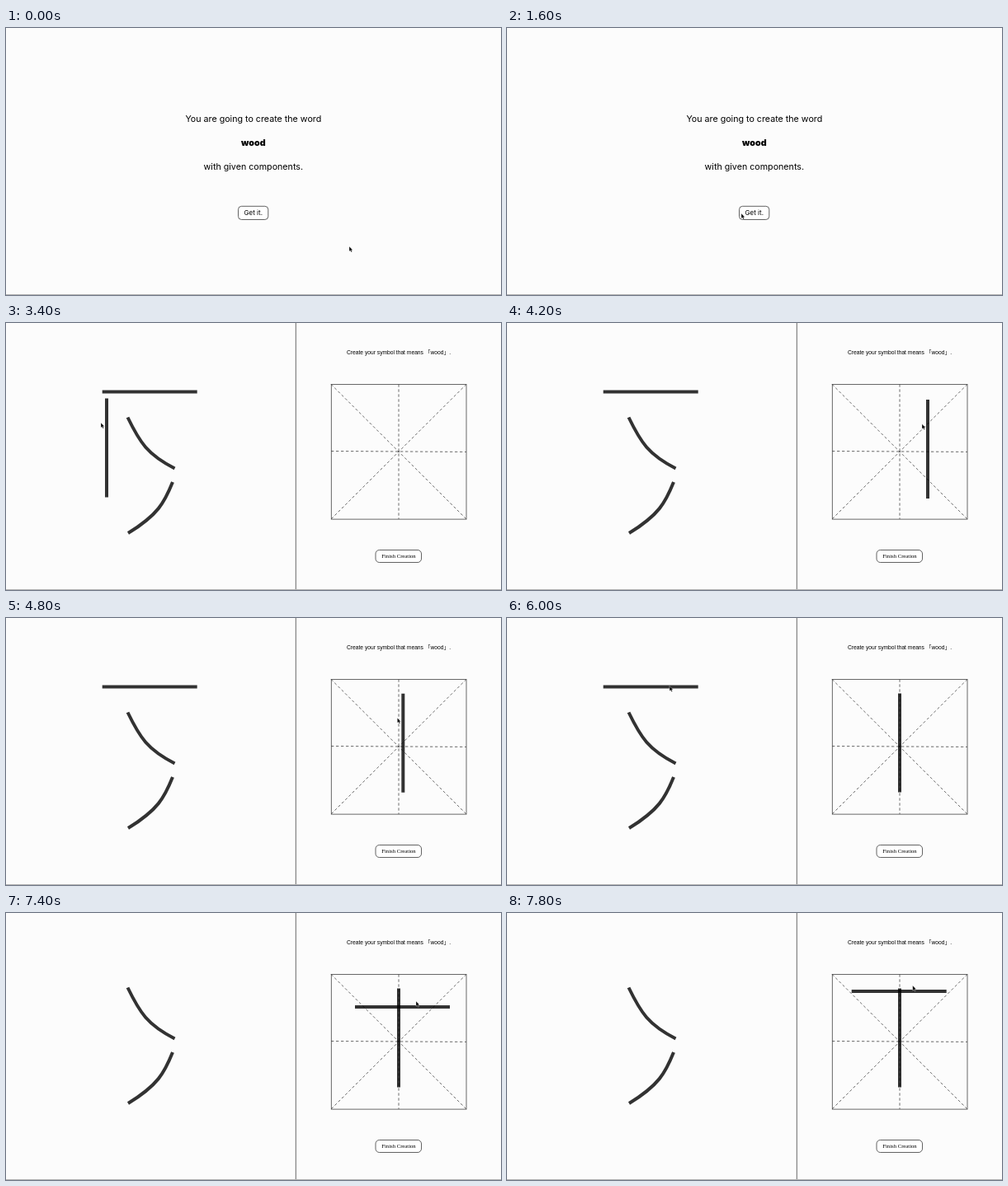
Animation of 600x324 px, one loop 8000 ms. Source, as an HTML page:

```html
<!DOCTYPE html>
<html lang="en">
<head>
<meta charset="utf-8">
<style>
  html, body { margin: 0; width: 100%; height: 100%; overflow: hidden; background: #fcfcfc; }
  svg { display: block; width: 100%; height: 100%; }
  text { text-anchor: middle; }
  #intro { font: 10.7px Inter, sans-serif; }
  #intro .word { font-weight: 900; }
  #intro .label { font-size: 8px; }
  #task { font: 6.7px "Liberation Sans", "Noto Sans CJK JP", sans-serif; }
  #task .label { font-family: "Liberation Serif", serif; }
  .line { fill: none; stroke: #444; stroke-width: .8; }
  .button { fill: #fff; stroke: #222; stroke-width: .7; }
  .stroke { fill: none; stroke: rgba(0, 0, 0, .8); stroke-width: 4; }
</style>
</head>
<body>
<svg viewBox="0 0 600 324">
  <rect width="600" height="324" fill="#fcfcfc"/>
  <rect y="323" width="600" height="1" fill="#b4b4b4"/>

  <g id="intro">
    <text x="299.8" y="114.3">You are going to create the word</text>
    <text x="299.8" y="143.2" class="word">wood</text>
    <text x="299.8" y="172">with given components.</text>
    <rect class="button" x="281.5" y="216.3" width="36.3" height="16.2" rx="4"/>
    <text x="299.8" y="227" class="label">Get it.</text>
  </g>

  <g id="task">
    <path class="line" d="M351.3 0V323"/>
    <text x="476" y="38">Create your symbol that means 「wood」.</text>
    <rect class="line" x="394.3" y="74.4" width="163.7" height="163.7"/>
    <path class="line" stroke-dasharray="3.3 2.7"
      d="M394 74.4L558 238M558 74.4L394 238M476 74.4V238M394 155.5L558 156.4"/>
    <rect class="button" x="448" y="275.5" width="55.5" height="15" rx="4.5"/>
    <text x="476" y="285.2" class="label">Finish Creation</text>
    <path id="upright" class="stroke" d="M0 0V120"/>
    <path id="bar" class="stroke" d="M0 0H115"/>
    <path id="right" class="stroke" d="M0 0C15 31 24 45 57 62"/>
    <path id="left" class="stroke" d="M0 0C-10 25 -18 40 -54 62"/>
  </g>

  <path id="cursor" d="M0 0V6.1L1.4 4.9L2.4 7.1L3.5 6.6L2.6 4.5H4.3Z" stroke="#fff" stroke-width=".35"/>
</svg>
<script>
const LOOP = 8000, STEP = 200;
const OPEN = 2000, GRAB_UPRIGHT = 3400, DROP_UPRIGHT = 5000, GRAB_BAR = 6400;

const home = { x: 416, y: 265 };
const moves = [
  { start: 800, end: 1600, x: 284, y: 225 },             // to the button
  { start: 2200, end: 2800, x: 128, y: 122 },            // to the upright
  { start: 2800, end: GRAB_UPRIGHT, x: 115, y: 121 },
  { start: GRAB_UPRIGHT, end: 4200, x: 503, y: 122.5 },  // drag it, then centre it
  { start: 4200, end: DROP_UPRIGHT, x: 469, y: 121 },
  { start: 5200, end: 6000, x: 197, y: 82.5 },           // to the bar
  { start: GRAB_BAR, end: 6800, x: 483, y: 124 },        // drag it, then lift it
  { start: 6800, end: 7400, x: 497, y: 107 },
  { start: 7400, end: 7800, x: 491.7, y: 88 }
];

const get = id => document.getElementById(id);
const smooth = k => k * k * (3 - 2 * k);

function cursorAt(time) {
  let { x, y } = home;
  for (const move of moves) {
    const k = (time - move.start) / (move.end - move.start);
    const eased = smooth(Math.min(1, Math.max(0, k)));
    x += (move.x - x) * eased;
    y += (move.y - y) * eased;
  }
  return { x, y };
}

function place(id, x, y) {
  get(id).setAttribute("transform", `translate(${x} ${y})`);
}

function show(id, visible) {
  get(id).style.display = visible ? "" : "none";
}

function draw(now) {
  const t = Math.floor(now % LOOP / STEP) * STEP;
  const cursor = cursorAt(t);
  show("intro", t < OPEN);
  show("task", t >= OPEN);
  place("cursor", cursor.x, cursor.y);

  // The remaining pieces reflow whenever one is picked up
  if (t < GRAB_UPRIGHT) {
    place("upright", 116, 87);
    place("bar", 56, 46);
    place("right", 86.5, 230.5);
    place("left", 310.5, 129.5);
  } else {
    const grip = cursorAt(Math.min(t, DROP_UPRIGHT));
    const barTaken = t >= GRAB_BAR, rise = barTaken ? 24 : 0;
    place("upright", grip.x + 7, grip.y - 29.5);
    if (barTaken) place("bar", cursor.x - 74, cursor.y + 7);
    else place("bar", 116.7, 83.5);
    place("right", 147.5, 114.5 - rise);
    place("left", 202, 193 - rise);
  }
  requestAnimationFrame(draw);
}
requestAnimationFrame(draw);
</script>
</body>
</html>
```
